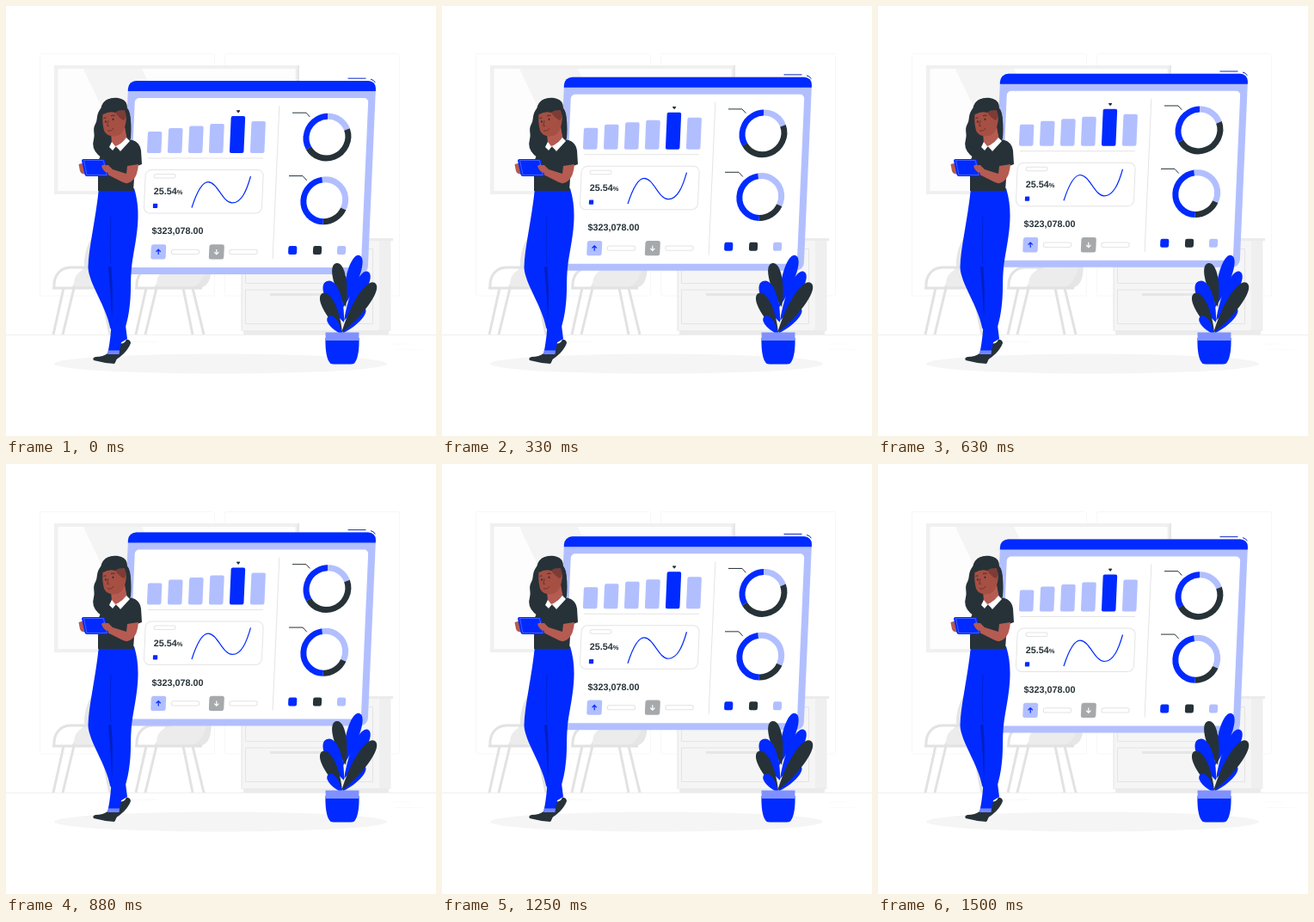
Recreate the animation shown at these times as an HTML page. Size 500 by 500 pixels, loop 1.54 s.

```html
<!DOCTYPE html>
<html lang="en">
<head>
<meta charset="utf-8">
<style>
html, body { margin: 0; width: 100%; height: 100%; overflow: hidden; background: #fff; }
svg { display: block; width: 100%; height: 100%; }
text { font: bold 10.8px "Liberation Sans", Arial, sans-serif; fill: #263238; text-rendering: geometricPrecision; }
tspan { font-size: 7.5px; }
.blue { fill: #002aff; }
.light { fill: #b2bfff; }
.dark { fill: #263238; }
.skin { fill: #b55b52; }
.line { fill: none; stroke: #e4e4e4; }
.ink { fill: none; stroke: #263238; }
</style>
</head>
<body>
<svg viewBox="0 0 500 500">
  <!-- room -->
  <g fill="none" stroke="#f7f7f7">
    <rect x="39.5" y="55.5" width="203" height="281.5" rx="2"/>
    <rect x="254.5" y="55.5" width="203" height="281.5" rx="2"/>
    <path d="M146 390.5H176M449 393H470M452 399.5H484" stroke="#fafafa"/>
    <path d="M0 382.5H500" stroke="#efefef"/>
  </g>
  <path d="M56 69H341V219H56Z" fill="#f0f0f0"/>
  <path d="M60.5 73H336.5V215H60.5Z" fill="#fdfdfd"/>
  <path d="M90 73H158L226 215H158Z" fill="#f4f4f4"/>
  <path d="M338.5 69H341V219H338.5Z" fill="#e6e6e6"/>
  <ellipse cx="249.5" cy="416" rx="193.500" ry="11.5" fill="#f5f5f5"/>

  <!-- cabinet -->
  <path d="M274 270H434V378H274Z" fill="#f5f5f5"/>
  <path d="M434 273H447.5V378H434Z" fill="#efefef"/>
  <path d="M272 270H450V273H272ZM276 377H445V382H276Z" fill="#ebebeb"/>
  <path d="M278.5 282.5H426.5V322.5H278.5ZM278.5 330H426.5V369.5H278.5ZM274 270V378" class="line"/>
  <path d="M307 335.5H380" stroke="#e6e6e6" stroke-width="3"/>

  <!-- chairs -->
  <g id="chair">
    <path d="M187 303C186 292 191 272 199 267L230 267C240 270 240 302 238 312Q236 328 222 328H172Z" fill="#e6e6e6"/>
    <path d="M176 327C172 311 187 302 206 303L233 304Q229 323 216 327Z" fill="#ececec"/>
    <path d="M152 328C151 314 158 305 170 304H192M150 328H228M163 328L151 382M175 328L162 382M206 328L217 382M217 328L230 382" fill="none" stroke="#e2e2e2" stroke-width="3"/>
  </g>
  <use href="#chair" x="-96"/>

  <!-- dashboard -->
  <g id="board">
    <path d="M397.5 84.2H418.5M424 85.2Q428 86 429.300 89" fill="none" stroke="#0b25c4"/>
    <g transform="matrix(1 0 -.0437 1 8.740 0)">
      <rect class="light" x="137.4" y="87" width="288" height="225" rx="9"/>
      <path class="blue" d="M137.4 99V96a9 9 0 0 1 9-9H416.4a9 9 0 0 1 9 9V99Z"/>
      <rect x="145.9" y="107" width="271.4" height="197" rx="5" fill="#fff"/>
      <g id="bars"></g>
      <path class="line" d="M164 177H298M314.2 116V294"/>
      <rect class="line" x="162" y="190.5" width="137" height="50.5" rx="7"/>
      <rect class="line" x="172" y="195.5" width="25" height="4.5" rx="2.2"/>
      <rect class="line" x="196" y="283.2" width="32.5" height="5.4" rx="2.7"/>
      <rect class="line" x="263.5" y="283.2" width="32.5" height="5.4" rx="2.7"/>
      <rect class="blue" x="172.3" y="229.8" width="5.3" height="5.2" rx=".8"/>
      <rect class="light" x="172.3" y="277.2" width="17.4" height="17.4" rx="2.5"/>
      <rect fill="#a6a9ab" x="239.9" y="277.2" width="17.4" height="17.4" rx="2.5"/>
      <rect class="blue" x="331.9" y="279" width="10" height="10" rx="2.2"/>
      <rect class="dark" x="360.7" y="279" width="10" height="10" rx="2.2"/>
      <rect class="light" x="388.7" y="279" width="10" height="10" rx="2.2"/>
      <g id="rings" fill="none" stroke-width="7"></g>
    </g>
    <path class="dark" d="M268 122Q268 120.6 270 121.2Q272 120.6 272.2 122L270.1 124.5Z"/>
    <path class="ink" d="M333 124.2H349L353.3 129M329 197.6H345L349.8 202.8"/>
    <path d="M216 234.5C222 216 228 204.7 235 204.7C246 204.7 252 229 263 229C274 229 280 214 284.5 198" fill="none" stroke="#002aff" stroke-width="1.2"/>
    <path d="M177.2 289V283.5M174.6 285.8L177.2 283.2L179.8 285.8" fill="none" stroke="#002aff" stroke-width="1.2"/>
    <path d="M244.8 283V288.5M242.2 286.2L244.8 288.8L247.4 286.2" fill="none" stroke="#fff" stroke-width="1.2"/>
    <text x="171.8" y="219.2">25.54<tspan>%</tspan></text>
    <text x="169.5" y="265.3">$323,078.00</text>
  </g>

  <!-- woman -->
  <path class="dark" d="M130 392Q138 394 140 387.5Q145 388 145 392C142 401 133 408 127 412L124 407Z"/>
  <path class="dark" d="M118 404L130 404Q129 412 126 416Q113 415 102 412Q100 409 104 408Q113 408 118 404Z"/>
  <path class="blue" d="M108 212H132L130 300L141 387L131 393L121 374C117 350 96 322 95.5 304C96 281 104 250 108 212Z"/>
  <path d="M119 304L128 300L134 380L123 377Q123 345 119 304Z" fill="#001fc0"/>
  <path class="blue" d="M121 212H149C157 238 153 262 148 290C143 318 147 330 143 355C140 375 133 388 132 405H118C123 385 126 340 122 300Z"/>
  <path d="M119 400.5H132L131.5 405H118Z" fill="#7384ff"/>
  <path d="M122 245Q120.5 275 122 300" fill="none" stroke="#001fc0" stroke-width=".7"/>
  <path class="dark" d="M111 118C113 107 126 105 134 108Q141 110 141 119C146 127 146 143 145 154Q139 164 130 165Q122 184 112 181Q112 176 107 173Q99 165 102 155C104 148 100 144 104 137C107 132 104 126 111 118Z"/>
  <path class="skin" d="M122 146L138 140L141 156Q136 166 127 166L123 161Z"/>
  <path d="M113 123Q123 122 131 119Q140 119 140 129Q139 148 129 151Q118 153 114 145Q111 133 113 123Z" fill="#a64f43"/>
  <path d="M127 124Q134 119 139 122Q141 130 137 133Q132 131 127 124Z" fill="#7d3c36"/>
  <path class="dark" d="M110 122Q111 108 126 107Q138 108 141 119Q145 122 145 137Q142 151 139 146Q142 131 138 121Q130 121 127 124Q120 122 113 126Z"/>
  <ellipse class="dark" cx="116" cy="134.5" rx=".9" ry="1.3"/>
  <ellipse class="dark" cx="124.5" cy="131.7" rx=".9" ry="1.3"/>
  <path class="ink" d="M113.5 131Q114.5 129.5 116.5 130M122 127.8Q124 126.5 126.5 127.5" stroke-width=".9"/>
  <path d="M119 133L117.8 139.5L120 139.5M118 145Q123 146 125 142" fill="none" stroke="#6d302c" stroke-width=".9"/>
  <path class="skin" d="M84.5 184L92 182L96 195Q88 197 86 192Z"/>
  <path class="dark" d="M123 160L130 166L142 155Q155 156 157 168L158 184L150 187L148 215H107V188Q106 172 123 160Z"/>
  <path d="M123 158L120 164L124 168L128 163L133 169L144 157L140 153Q134 161 127 163Z" fill="#fff"/>
  <path class="skin" d="M141 186L154 184Q153 198 147 203Q142 208 136 205L116 195Q109 190 112 185L119 185L124 190L140 195Z"/>
  <path class="blue" d="M90 178H113Q115 178 115.6 180L119 196Q119 198 117 198H94Q92 198 91.5 196L88 180Q88 178 90 178Z"/>
  <path d="M90.5 179.5H113.3L117.3 196.5H94Z" fill="none" stroke="#6f82ff" stroke-width=".6"/>
  <path class="skin" d="M111 186Q114 183 118 186L122 190L119 194Q113 193 111 186Z"/>

  <!-- plant -->
  <g id="leaves"></g>
  <path class="blue" d="M371.5 386H410.5C411 400 409 410 406 414Q405 416.5 401 416.5H381Q377 416.5 376 414C373 410 371 400 371.5 386Z"/>
  <path d="M371.5 379.5H410.5L410.3 389H371.7Z" fill="#8091ff"/>
</svg>
<script>
const $ = id => document.getElementById(id);

$('bars').innerHTML = [25, 29, 31.5, 34, 43, 37].map((h, i) =>
  `<rect class="${i === 4 ? 'blue' : 'light'}" x="${162.6 + 24 * i}" y="${171 - h}" width="16.5" height="${h}" rx="2"/>`
).join('');

// Angles run clockwise from the top of the ring.
const arc = (cy, from, to, color) =>
  `<circle cx="371.4" cy="${cy}" r="24.4" stroke="${color}" pathLength="360"
    stroke-dasharray="${to - from} 360" transform="rotate(${from - 90} 371.4 ${cy})"/>`;
const ring = (cy, a, b, c) =>
  arc(cy, a, b, '#b2bfff') + arc(cy, b, c, '#263238') + arc(cy, c, a + 360, '#002aff');
$('rings').innerHTML = ring(152.7, -1, 68, 239) + ring(226.3, -9, 113, 181);

// A leaf tapers at its base and is round at its tip.
function leaf(x, y, tipX, tipY, width, color) {
  const dx = tipX - x, dy = tipY - y, len = Math.hypot(dx, dy);
  const at = (along, side) =>
    `${x + dx * along - dy / len * width * side} ${y + dy * along + dx / len * width * side}`;
  return `<path class="${color}" d="M${x} ${y}C${at(.5, 1)} ${at(1, 1)} ${at(1, 0)}C${at(1, -1)} ${at(.5, -1)} ${at(0, 0)}Z"/>`;
}
$('leaves').innerHTML = [
  [391, 352, 411, 290, 10, 'blue'],
  [393, 366, 421, 309, 10, 'blue'],
  [395, 350, 384, 299, 10, 'dark'],
  [393, 368, 373, 320, 12, 'blue'],
  [391, 381, 417, 351, 8, 'blue'],
  [390, 380, 429, 322, 11, 'dark'],
  [391, 380, 368, 334, 10, 'dark'],
  [391, 382, 375, 361, 7, 'blue']
].map(args => leaf(...args)).join('');

const LOOP = 1540, PEAK = 730, TRAVEL = 10;
function frame() {
  const phase = (performance.now() - PEAK + LOOP) % LOOP / LOOP;
  const y = .5 - TRAVEL * Math.abs(1 - 2 * phase);
  $('board').setAttribute('transform', `translate(0 ${y})`);
  requestAnimationFrame(frame);
}
frame();
</script>
</body>
</html>
```
